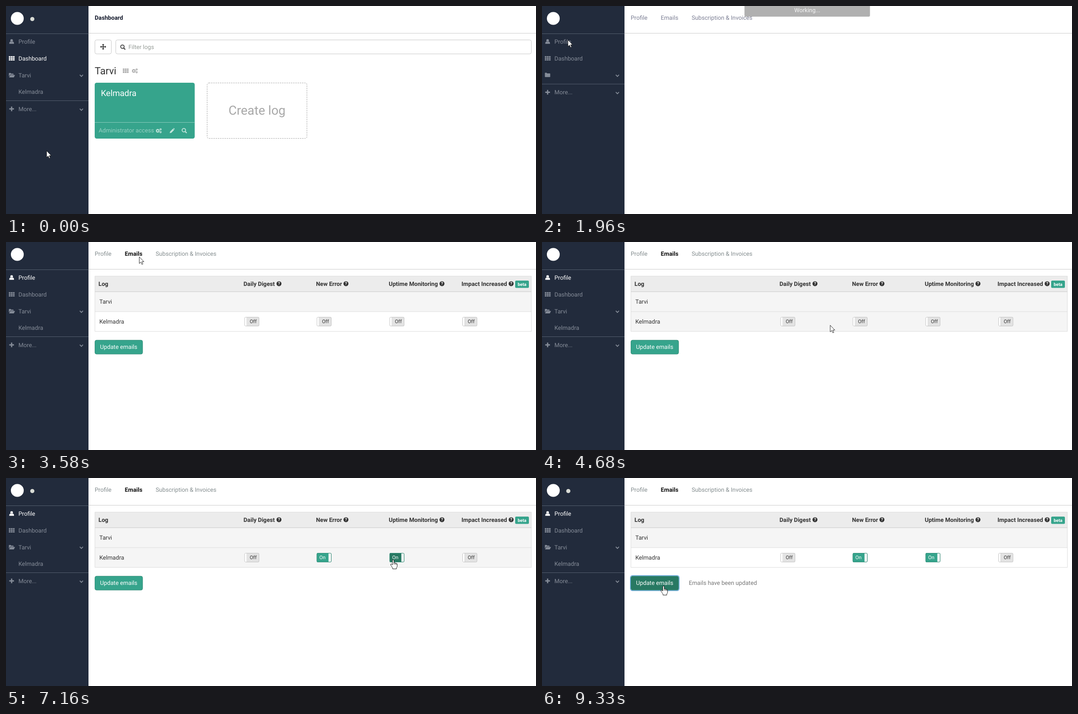
An HTML page for the animation above (9.71 s loop, 1195 by 469 pixels).

```html
<!DOCTYPE html>
<html lang="en">
<head>
<meta charset="utf-8">
<title>Email settings</title>
<style>
html, body { margin: 0; width: 100%; height: 100%; overflow: hidden; background: #fff; }
svg { display: block; width: 100%; height: 100%; color: #333; fill: currentColor;
  font-family: Roboto, Arial, sans-serif; text-rendering: geometricPrecision; }
text { white-space: pre; }
.line { fill: none; stroke: currentColor; }
</style>
</head>
<body>
<svg id="stage" viewBox="0 0 1195 469" xmlns="http://www.w3.org/2000/svg"></svg>
<script>
const LOOP = 9710, GREEN = '#36a48c', DARK = '#287963', MUTED = '#858c98', BASE = 13.2;
const ORG = 'Tarvi', LOG = 'Kelmadra';

// Markup helpers; text is placed by the vertical centre of its capitals
const text = (x, cy, str, attrs = '', size = BASE) =>
  `<text x="${x}" y="${cy + size * 0.355}" font-size="${size}" ${attrs}>${str}</text>`;
const bold = (x, cy, str, attrs = '') => text(x, cy, str, 'font-weight="700" ' + attrs);
const rect = (x, y, w, h, fill, attrs = '') =>
  `<rect x="${x}" y="${y}" width="${w}" height="${h}" fill="${fill}" ${attrs}/>`;
const group = (id, body, attrs = '') => `<g id="${id}" ${attrs}>${body}</g>`;
const at = (x, y, body, attrs = '') => `<g transform="translate(${x} ${y})" ${attrs}>${body}</g>`;
const path = (d, attrs = '') => `<path d="${d}" ${attrs}/>`;
const stroke = (d, w) => path(d, `class="line" stroke-width="${w}"`);
const field = (x, y, w) => rect(x, y, w, 31.5, '#fff', 'rx="3.8" stroke="#c6c6c6"');

// Icons are centred on their own origin
const gear = (r, w) => `<circle r="${r}" class="line" stroke-width="${w}"/>` +
  `<circle r="${r + w * 0.65}" class="line" stroke-width="1.2" stroke-dasharray="${r * 0.5}"/>`;
const icon = {
  user: '<circle cy="-2.3" r="2.9"/>' + path('M-5.3 5.2V3.6Q-5 .4-2.3 .2Q0 1.8 2.3 .2Q5 .4 5.3 3.6V5.2Z'),
  grid: [0, 1, 2].map(r => [0, 1, 2].map(c =>
    rect(-6.6 + c * 4.6, -5 + r * 3.6, 3.8, 2.8, 'currentColor', 'rx=".5"')).join('')).join(''),
  openFolder: path('M-6.5 3V-4Q-6.5-5-5.5-5H-2.5L-1.3-3.6H3Q4-3.6 4-2.6V-1.3H-3.5Z') +
    path('M-3.2-.4H7.4L4.6 5H-6.2Z'),
  folder: path('M-6 3.8V-3.8Q-6-5-5-5H-2.2L-1-3.6H5Q6-3.6 6-2.6V3.8Q6 4.8 5 4.8H-5Q-6 4.8-6 3.8Z'),
  plus: stroke('M-5.3 0H5.3M0-5.3V5.3', 2.8),
  chevron: stroke('M-3.6-1.8L0 1.8L3.6-1.8', 1.9),
  search: '<circle cx="-1" cy="-1" r="3.9" class="line" stroke-width="1.9"/>' + stroke('M1.8 1.8L5.4 5.4', 2.3),
  pencil: path('M-5.4 5.4L-4.6 2.2L1.8-4.2L4.6-1.4L-1.8 5ZM2.5-4.9L3.3-5.6Q4-5.9 4.6-5.3L5.5-4.4Q6-3.8 5.5-3.2L5.1-2.3Z'),
  cogs: at(-2.4, .4, gear(2.6, 1.9)) + at(4, -2.8, gear(1.3, 1.1)) + at(4, 3.4, gear(1.3, 1.1)),
  move: stroke('M-5 0H5M0-5V5', 1.7) +
    path('M0-6.8L2.5-4H-2.5ZM0 6.8L2.5 4H-2.5ZM-6.8 0L-4-2.5V2.5ZM6.8 0L4-2.5V2.5Z'),
  help: '<circle r="5.6"/>' + text(0, 0, '?', 'fill="#fff" text-anchor="middle" font-weight="700"', 9.5)
};
const put = (name, x, y, color) => at(x, y, icon[name], color ? `color="${color}"` : '');

const arrow = path('M.5 .5V15.5L4 12.3L6.4 17.6L8.7 16.6L6.4 11.4H11Z', 'fill="#fff" stroke="#111" stroke-width=".9"');
const hand = path('M-1.7 2Q-1.7 .4 0 .4T1.7 2V7Q4.1 6.2 4.6 8Q6.8 7.3 7.2 9Q9.1 8.8 9.1 10.6V14.5Q9.1 16.6 7.3 18.6V21H-1.2V18.6Q-2.2 17.5-3.3 15.6T-5.7 12Q-6.4 10.2-4.8 9.9T-1.7 12Z',
  'fill="#fff" stroke="#111" stroke-linejoin="round"') +
  path('M1.7 7V11M4.5 8V11.3M7.2 9V11.6', 'fill="none" stroke="#111" stroke-width=".9"');

const sidebar = rect(0, 0, 186, 469, '#222b3c') +
  '<circle cx="25.5" cy="28" r="14.5" fill="#fff"/>' +
  group('dot', '<circle cx="59.3" cy="29.4" r="4.7" fill="#d8dbd5"/>') +
  rect(0, 62, 186, 1, '#566070') +
  group('nav0', put('user', 12.7, 80) + text(28, 80, 'Profile')) +
  group('nav1', put('grid', 13, 118) + text(28, 118, 'Dashboard')) +
  group('nav2', group('orgOpen', put('openFolder', 13, 156) + text(28, 156, ORG)) +
    group('orgClosed', put('folder', 12.5, 155.5)) + put('chevron', 170, 157)) +
  group('nav3', text(28, 193.7, LOG)) +
  group('more', rect(0, 213, 186, 1, '#566070') +
    group('nav4', put('plus', 12.7, 232) + text(28, 232, 'More...') + put('chevron', 170, 233.5)));

const header = rect(186, 61, 1009, 1, '#cacaca') +
  group('tabs', ['Profile', 'Emails', 'Subscription &amp; Invoices'].map(s => text(200, 26.5, s)).join(''));

const dashboard = bold(200, 26.5, 'Dashboard', 'fill="#141a2c"') +
  field(200.5, 76.5, 37) + put('move', 219, 92, '#222') +
  field(247.5, 76.5, 937) + put('search', 263.5, 92.8, '#444') + text(276, 92.5, 'Filter logs', 'fill="#969c97"') +
  text(200, 146, ORG, '', 22.6) + put('grid', 270, 146, '#aaa') + put('cogs', 290.5, 146, '#aaa') +
  rect(200, 173, 225.5, 126, GREEN, 'rx="4.5"') + text(214, 196.7, LOG, 'fill="#fff"', 18.9) +
  rect(200, 262, 225.5, 1, '#8cccbd') + text(209, 280, 'Administrator access', 'fill="#97d0c3"') +
  put('cogs', 344.5, 281, '#c3e4dc') + put('pencil', 374.5, 281, '#c3e4dc') + put('search', 402, 281, '#c3e4dc') +
  rect(453.5, 173.5, 225, 125, 'none', 'rx="4" stroke="#a2a2a2" stroke-dasharray="3 2"') +
  text(566, 235, 'Create log', 'fill="#a8a8a8" text-anchor="middle"', 28.3);

const button = (id, y, w, label) => rect(200.5, y, w, 31.5, GREEN, `id="${id}" rx="3.8" stroke="#2e8b76"`) +
  text(212, y + 15.5, label, 'fill="#fff"');

const profile = bold(200, 85.5, 'Name') + field(200.5, 100.5, 393) +
  bold(200, 155.3, 'Email') + field(200.5, 170.5, 240) +
  path('M436 170H589.5Q593.3 170 593.3 174V198Q593.3 202 589.5 202H436Z', 'fill="#69bddc"') +
  text(448, 185.5, 'Subscribe newsletter...', 'fill="#fff"') +
  bold(200, 225, 'Timezone') + field(200.5, 240, 393) + path('M582 253.5H588.5L585.2 258.8Z') +
  group('values', text(212, 116.3, 'Martin Solby') + text(212, 186.2, 'martsolby@example.com') +
    text(216, 256, '(UTC+01:00) Brussels, Copenhagen, Madrid, Paris'), 'fill="#555"') +
  bold(200, 295, 'Stay signed in') + put('help', 292.5, 294.8) +
  rect(200.5, 309.5, 55, 32, '#e6e6e6', 'rx="3.8" stroke="#c9c9c9"') +
  rect(201, 310, 11, 31, '#fff', 'rx="3"') + rect(211.5, 310, 1, 31, '#c9c9c9') + text(224, 325.3, 'Off') +
  button('saveProfile', 365.5, 106, 'Update profile');

const columns = [[537.5, 535.5, 'Daily Digest', 615.5], [700.5, 699, 'New Error', 766.5],
  [864.7, 863, 'Uptime Monitoring', 983], [1029, 1027, 'Impact Increased', 1139]];

const toggle = (x, i) => at(x, 169, `<g clip-path="url(#pill)">` + rect(0, 0, 33, 21, '#fff') +
  group('slide' + i, rect(0, 0, 27, 21, GREEN, `id="on${i}"`) + text(6, 10.3, 'On', 'fill="#fff"', 11.3) +
    rect(27, 0, 6, 21, '#fff') + rect(32, 0, 1, 21, '#c9c9c9') + rect(33, 0, 27, 21, '#e3e3e3') +
    text(39, 10.3, 'Off', '', 11.3)) + '</g>' +
  rect(.5, .5, 32.5, 20, 'none', `id="edge${i}" rx="2.5" stroke="#c4c4c4"`));

const emails = rect(200.5, 77, 984, 35, '#ececec') + rect(200.5, 112, 984, 45, '#f5f5f5') +
  rect(200.5, 157, 984, 44.5, '#fff', 'id="row"') +
  rect(200.5, 77, 984, 124.5, 'none', 'stroke="#dcdcdc"') +
  rect(200, 111.2, 985, 1.6, '#d8d8d8') + rect(200, 156.5, 985, 1, '#dcdcdc') +
  bold(208.5, 94, 'Log') + text(210.5, 134.5, ORG) + text(210.5, 179, LOG) +
  columns.map(([x, tx, label, hx], i) => bold(tx, 94, label) + put('help', hx, 94) + toggle(x, i)).join('') +
  rect(1148, 87, 31, 16.5, GREEN, 'rx="2.5"') +
  text(1163.5, 95.3, 'beta', 'fill="#fff" font-weight="700" text-anchor="middle"', 9.9) +
  rect(199.3, 220, 110, 34, 'none', 'id="focus" rx="4.5" stroke="#5f9fe0" stroke-width="1.4"') +
  button('saveEmails', 221.3, 107.5, 'Update emails') +
  group('message', text(331, 236, 'Emails have been updated'));

const stage = document.getElementById('stage');
stage.innerHTML = '<defs><clipPath id="pill"><rect width="33.5" height="21" rx="2.5"/></clipPath></defs>' +
  sidebar + header + group('dash', dashboard) + group('profile', profile) + group('emails', emails) +
  group('working', path('M456.5 0H739.5V27Q739.5 30 736.5 30H459.5Q456.5 30 456.5 27Z', 'fill="#b0b0b0"') +
    text(598, 15, 'Working...', 'fill="#f4f4f4" text-anchor="middle"')) +
  group('cursor', group('arrow', arrow) + group('hand', hand));

const el = {};
stage.querySelectorAll('[id]').forEach(n => el[n.id] = n);
const tabs = [...el.tabs.children];
const show = (id, on) => el[id].setAttribute('display', on ? 'inline' : 'none');
const move = (id, x, y) => el[id].setAttribute('transform', `translate(${x} ${y})`);
const clamp = v => Math.max(0, Math.min(1, v));
const ease = v => v * v * (3 - 2 * v);

// Pointer moves: start, end, then three points of a quadratic curve
const moves = [
  [720, 1500, 91, 326, 84, 170, 58, 76],
  [2740, 3290, 78, 88, 180, 75, 300, 33],
  [4010, 4910, 300, 33, 520, 200, 712, 188],
  [5000, 5150, 712, 188, 714, 186, 715, 182],
  [5710, 6250, 715, 182, 790, 226, 873, 184],
  [7230, 7940, 690, 229, 480, 372, 274, 243]
];
function pointer(t) {
  const [a, b, x0, y0, x1, y1, x2, y2] = moves.filter(m => m[0] <= t).pop() || moves[0];
  const u = ease(clamp((t - a) / (b - a))), v = 1 - u;
  const mix = (p, q, r) => v * v * p + 2 * u * v * q + u * u * r;
  return [mix(x0, x1, x2), mix(y0, y1, y2)];
}

const clicks = [Infinity, 5290, 6540, Infinity];
const navY = [80, 118, 156, 194, 232];

function render(t) {
  const page = t < 1960 ? 'dash' : t < 2040 ? 'load' : t < 3580 ? 'profile' : 'emails';
  const [x, y] = pointer(t);
  const inside = (l, top, w, h) => x >= l && x <= l + w && y >= top && y <= top + h;
  const loaded = t < 1960 || t >= 2740;

  ['dash', 'profile', 'emails'].forEach(p => show(p, p === page));
  show('dot', t < 1960 || t >= 6700);

  const active = page === 'dash' ? 1 : page === 'load' ? -1 : 0;
  navY.forEach((cy, i) => {
    const over = page === 'dash' && x < 186 && Math.abs(y - cy) < 19;
    el['nav' + i].setAttribute('color', i === active || over ? '#fff' : MUTED);
  });
  show('orgOpen', loaded);
  show('orgClosed', !loaded);
  show('nav3', loaded);
  move('more', 0, loaded ? 0 : -37.5);

  show('tabs', page !== 'dash');
  const tab = { profile: 0, emails: 1 }[page];
  const tabX = page === 'profile' ? [200, 269.3, 339] : [200, 267.8, 337.4];
  tabs.forEach((n, i) => {
    n.setAttribute('x', tabX[i]);
    n.setAttribute('font-weight', i === tab ? 700 : 400);
    n.setAttribute('fill', i === tab ? '#111' : page === 'load' ? '#7c7f94' : '#848d8f');
  });

  show('working', t >= 1960 && t < 3100);
  move('working', 0, t < 2040 ? -6 : t < 2740 ? 0 : -8 - 24 * clamp((t - 2740) / 320));
  show('values', loaded);

  let overToggle = false;
  columns.forEach(([cx], i) => {
    const on = ease(clamp((t - clicks[i]) / 310));
    const over = inside(cx, 168, 34, 22);
    overToggle = overToggle || over;
    move('slide' + i, 27 * (on - 1), 0);
    el['on' + i].setAttribute('fill', over && t > clicks[i] + 400 ? DARK : GREEN);
    el['edge' + i].setAttribute('stroke', on > 0.5 ? '#2e8b76' : '#c4c4c4');
  });
  el.row.setAttribute('fill', inside(200, 157, 985, 44) ? '#f5f5f5' : '#fff');

  const overSave = inside(200, 221, 109, 32);
  el.saveEmails.setAttribute('fill', overSave ? DARK : GREEN);
  show('focus', t >= 7940);
  el.message.setAttribute('opacity', t < 8090 ? 0 : t < 8170 ? 0.5 : t < 9330 ? 1 : 0.67);

  const overNav = x < 186 && y > 62 && y < 251 && (t < 1730 || t >= 2270);
  const overTab = page === 'profile' && inside(262, 12, 52, 36);
  const link = overNav || overTab || page === 'emails' && (overToggle || overSave);
  show('hand', link);
  show('arrow', !link);
  move('cursor', x, y);
}

const start = performance.now();
function tick() {
  render((performance.now() - start) % LOOP);
  requestAnimationFrame(tick);
}
tick();
</script>
</body>
</html>
```
